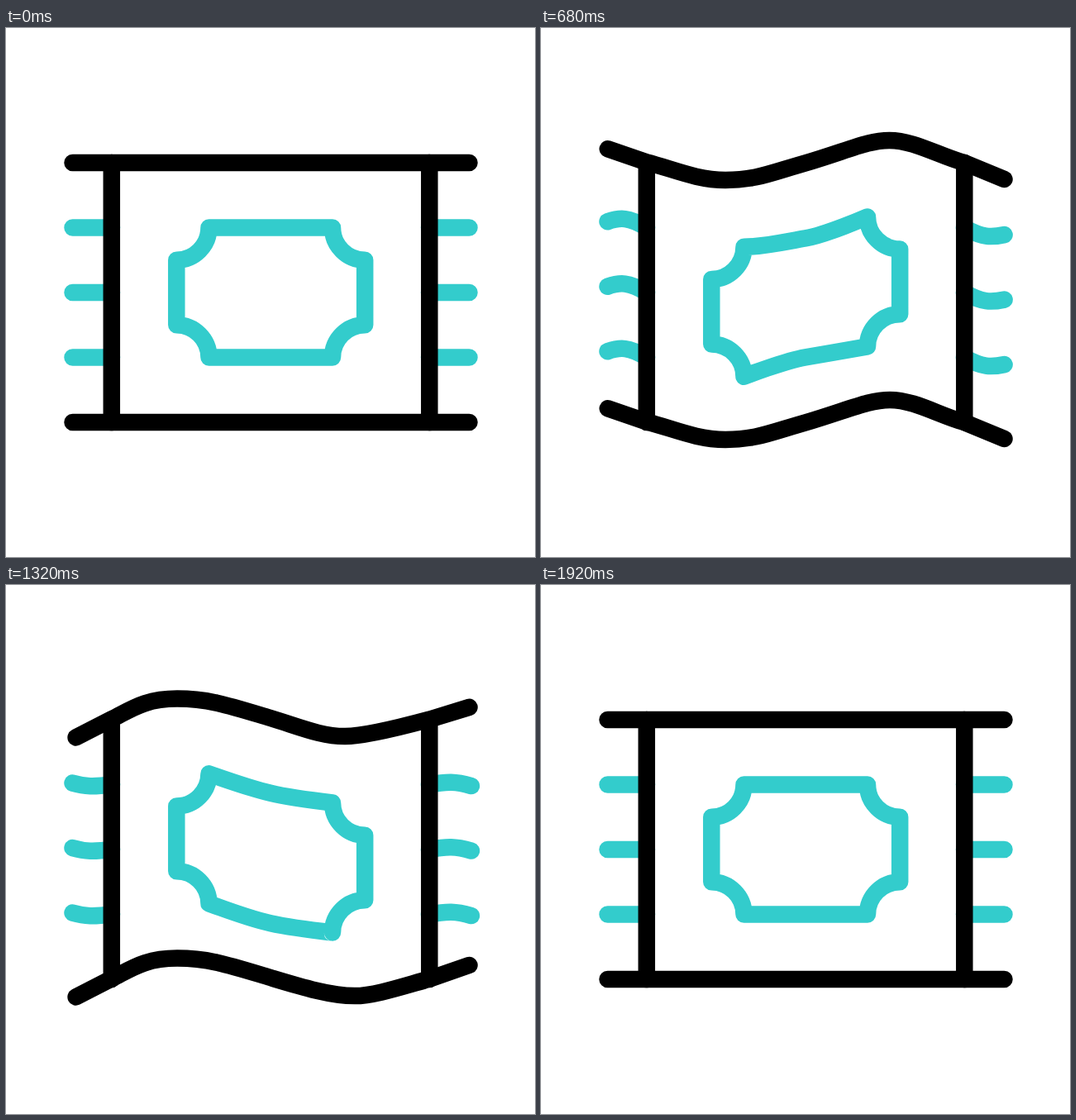
Animation, 640 px wide and 640 px high, one loop 2 s. Source, as an HTML page:

```html
<!DOCTYPE html>
<html lang="en">
<head>
<meta charset="utf-8">
<title>Waving rug</title>
<style>
  html, body { margin: 0; width: 100%; height: 100%; overflow: hidden; background: #fff; }
  svg { display: block; width: 100%; height: 100%; }
  path { fill: none; stroke-width: 20.5; stroke-linecap: round; stroke-linejoin: round; }
  .teal { stroke: #33cccc; }
  .black { stroke: #000; }
</style>
</head>
<body>
<svg viewBox="0 0 640 640">
  <path class="teal" id="fringe"/>
  <path class="teal" id="badge"/>
  <path class="black" id="edges"/>
  <path class="black" d="M127.8 163V477M512.3 163V477"/>
</svg>
<script>
const LOOP = 2000, STEP = 40, START = 120, END = 1920;
const byId = id => document.getElementById(id);
const n = v => v.toFixed(2);
const easeIn = u => 2 * u * u - u * u * u;
const easeOut = u => 1 - easeIn(1 - u);
const easeBoth = u => u * u * (3 - 2 * u);

// Weights of the two waves, which peak at tA and tB; the rest is the flat pose.
function weights(t, tA, tB) {
  if (t <= START || t >= END) return { a: 0, b: 0 };
  if (t < tA) return { a: easeIn((t - START) / (tA - START)), b: 0 };
  if (t < tB) {
    const s = easeOut((t - tA) / (tB - tA));
    return { a: 1 - s, b: s };
  }
  return { a: 0, b: 1 - easeBoth((t - tB) / (END - tB)) };
}

const mix = (w, [a, b]) => w.a * a + w.b * b;

// Node: x = [flat, A, B], dy = [A, B], slope = [A, B], inn / out = handle lengths [A, B].
const NONE = [0, 0];
const node = (x, dy, slope = NONE, inn = NONE, out = NONE) => ({ x, dy, slope, inn, out });

function place(w, p, y0) {
  const x = p.x[0] + mix(w, [p.x[1] - p.x[0], p.x[2] - p.x[0]]);
  const y = y0 + mix(w, p.dy);
  const handle = (len, dir) => {
    const dx = len.map(l => l * dir);
    return [x + mix(w, dx), y + mix(w, dx.map((d, i) => d * p.slope[i]))];
  };
  return { at: [x, y], inn: handle(p.inn, -1), out: handle(p.out, 1) };
}

const pt = p => p.map(n).join(" ");
const curve = (p, q) => `C${pt(p.out)} ${pt(q.inn)} ${pt(q.at)}`;

function spline(w, nodes, y0) {
  const ps = nodes.map(p => place(w, p, y0));
  return "M" + pt(ps[0].at) + ps.slice(1).map((q, i) => curve(ps[i], q)).join("");
}

const edge = (troughB, endB) => [
  node([80.5, 80.5, 84.7], [-18.8, 22]),
  node([128, 128, 128], [-0.5, -0.8], [0.28, -0.5], NONE, [30, 25]),
  node([254, 224, 206], [23.5, -26], NONE, [35, 40], [38, 40]),
  node([320, 320, 320], [0.5, -2], [-0.32, 0.3], [40, 50], [54, 36]),
  node([415, 422, troughB], [-29.7, 20.6], NONE, [25, 30], [30, 25]),
  node([512, 512, 512], [0, -0.3], [0.3, -0.27], [30, 30]),
  node([560.5, 560.5, 560.5], [22, endB])
];
const topEdge = edge(410, -15.5), bottomEdge = edge(422, -17.5);

function fringe(w) {
  const eL = mix(w, [-7.5, -2]), cL = mix(w, [-13.5, 2.6]);
  const eR = mix(w, [9, 1.6]), cR = mix(w, [13, -4]), xR = 560.5 + mix(w, [0, 2.5]);
  return [241.5, 320, 398.5].map(y =>
    `M${n(80.5)} ${n(y + eL)}C96 ${n(y + cL)} 106 ${n(y + cL)} 128 ${y}` +
    `M512 ${y}C534 ${n(y + cR)} 544 ${n(y + cR)} ${n(xR)} ${n(y + eR)}`
  ).join("");
}

const same = x => [x, x, x];
const LEFT = [24.2, -13.4], RIGHT = [-14, 22.4], H = [25, 25];
const badgeTop = [
  node(same(245.5), LEFT, NONE, NONE, [25, 0]),
  node(same(320), [13, 10.5], [-0.18, 0.24], H, H),
  node(same(395), RIGHT)
];
const badgeBottom = [
  node(same(245.5), LEFT),
  node(same(320), [-0.5, 11], [-0.18, 0.22], H, H),
  node(same(395), RIGHT)
];

function badge(w) {
  const top = badgeTop.map(p => place(w, p, 241.5));
  const low = badgeBottom.map(p => place(w, p, 398.5));
  // Walk the lower edge from right to left.
  const back = low.reverse().map(p => ({ at: p.at, inn: p.out, out: p.inn }));
  const R = 39.2, K = 21.6, I = R - K;
  return "M" + pt(top[0].at) + curve(top[0], top[1]) + curve(top[1], top[2]) +
    `c0 ${K} ${I} ${R} ${R} ${R}v78.6c${-K} 0 ${-R} ${I} ${-R} ${R}` +
    "L" + pt(back[0].at) + curve(back[0], back[1]) + curve(back[1], back[2]) +
    `c0 ${-K} ${-I} ${-R} ${-R} ${-R}v-78.6c${K} 0 ${R} ${-I} ${R} ${-R}Z`;
}

function draw(t) {
  const w = weights(t, 650, 1260);
  byId("edges").setAttribute("d", spline(w, topEdge, 163) + spline(w, bottomEdge, 477));
  byId("fringe").setAttribute("d", fringe(w));
  byId("badge").setAttribute("d", badge(weights(t, 665, 1270)));
}

const origin = performance.now();
function tick() {
  const t = (performance.now() - origin) % LOOP;
  draw(Math.floor(t / STEP) * STEP);
  requestAnimationFrame(tick);
}
tick();
</script>
</body>
</html>
```
